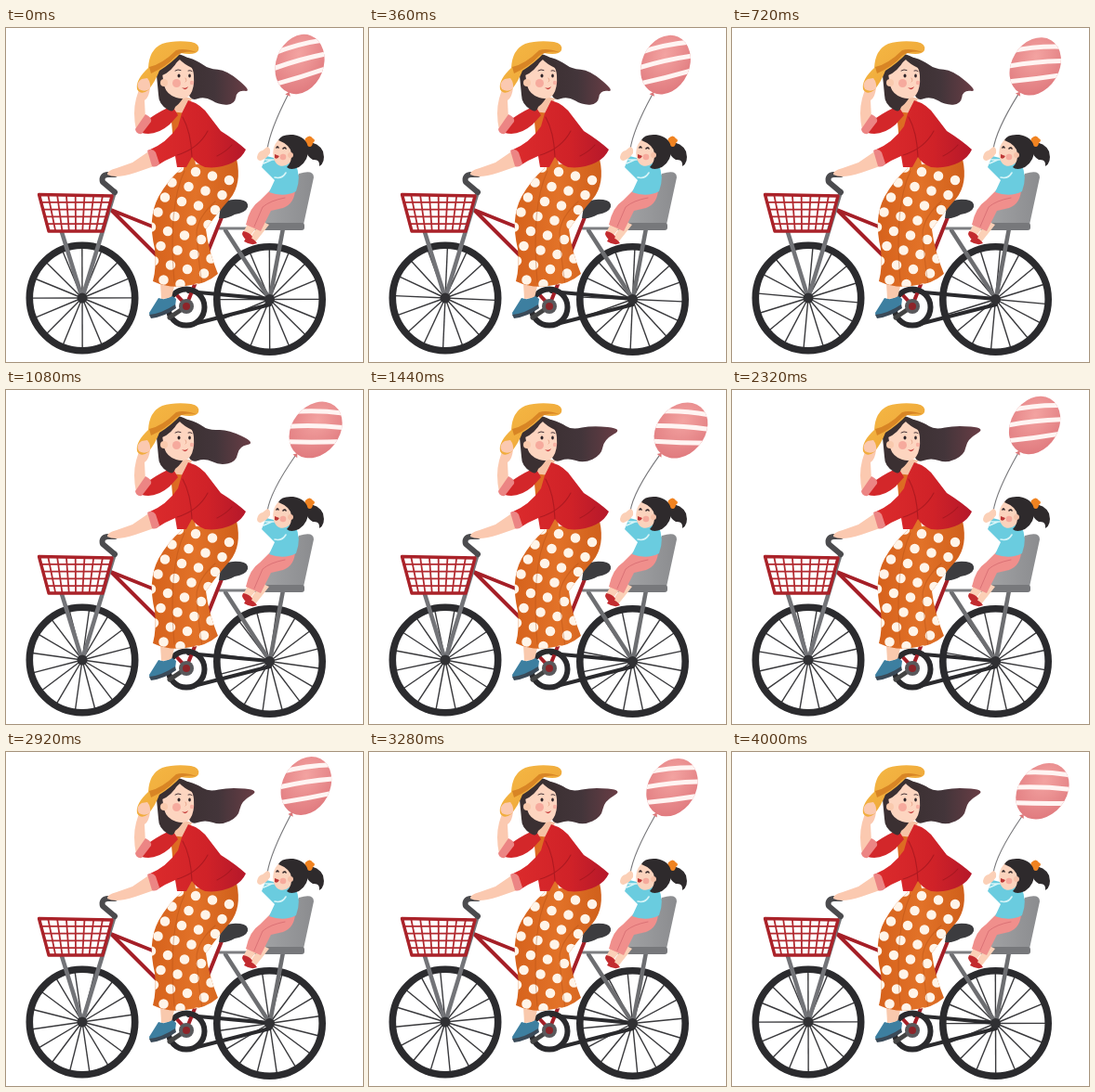
Animation of 384 by 360 pixels, one loop 4040 ms. Source, as an HTML page:

```html
<!DOCTYPE html>
<html lang="en">
<head>
<meta charset="utf-8">
<title>Bike ride</title>
<style>
html, body { margin: 0; width: 100%; height: 100%; overflow: hidden; background: #fff }
svg { display: block; width: 384px; height: 360px }
.line { fill: none; stroke-linecap: round; stroke-linejoin: round }
</style>
</head>
<body>
<svg viewBox="0 0 384 360">
  <defs>
    <linearGradient id="red"><stop stop-color="#dc2b2c"/><stop offset=".6" stop-color="#d02228"/><stop offset="1" stop-color="#b5182a"/></linearGradient>
    <linearGradient id="orange"><stop stop-color="#d6621c"/><stop offset=".5" stop-color="#e27228"/><stop offset="1" stop-color="#d0601b"/></linearGradient>
    <linearGradient id="straw" x2="1" y2="1"><stop stop-color="#f5b945"/><stop offset="1" stop-color="#eda236"/></linearGradient>
    <linearGradient id="grey"><stop stop-color="#a3a4a6"/><stop offset="1" stop-color="#8b8c8f"/></linearGradient>
    <linearGradient id="brown"><stop stop-color="#3b3032"/><stop offset=".5" stop-color="#43353a"/><stop offset="1" stop-color="#693d45"/></linearGradient>
    <radialGradient id="pink" cx=".4" cy=".35" r=".7"><stop stop-color="#f3a3a1"/><stop offset="1" stop-color="#e07a7e"/></radialGradient>
    <clipPath id="skin"><ellipse rx="25.5" ry="33"/></clipPath>
    <clipPath id="skirt"><use href="#dress"/></clipPath>
  </defs>

  <!-- rear wheel, drive and child seat -->
  <g class="wheel" transform="translate(283.5 292.500)"></g>
  <g class="line">
    <path d="M196 284L283 292M198 320L284 298" stroke="#2a2a2d" stroke-width="4"/>
    <path d="M236 218L283 291M298 216L284 291" stroke="#6d6e71" stroke-width="4.5"/>
    <path d="M230 216H300" stroke="#7d7e81" stroke-width="3"/>
  </g>
  <circle cx="283.5" cy="292.5" r="5.5" fill="#303033"/>
  <path d="M315 157Q331 152 331 161L320 212H271Q275 194 294 192Q305 188 308 171Z" fill="url(#grey)"/>
  <rect x="262" y="210" width="59" height="8" rx="3" fill="#77787b"/>

  <!-- balloon -->
  <path id="string" class="line" stroke="#77777a" stroke-width="1.1"/>
  <g id="balloon">
    <path d="M0 32L-3 36H3Z" fill="#dc7779"/>
    <ellipse rx="25.5" ry="33" fill="url(#pink)"/>
    <g clip-path="url(#skin)"><path class="line" transform="rotate(-36)" d="M-36 -17Q0 -23 36 -18M-36 -2Q0 -6 36 -3M-36 14Q0 14 36 11" stroke="#fff4f2" stroke-width="5"/></g>
  </g>

  <!-- child -->
  <path d="M263 206L254 222L261 226L273 211M275 208L261 228L268 231L283 212" fill="#fbd0b7"/>
  <path d="M255 219Q262 220 265 225L262 230Q255 227 254 222ZM260 225Q267 227 270 232Q264 235 256 230Q257 227 260 225Z" fill="#c32b2f"/>
  <path d="M285 174L311 173Q311 189 298 194L285 197L274 219L258 212Q262 193 273 186Z" fill="#f08f8c"/>
  <path d="M300 183Q284 186 276 193L267 214" class="line" stroke="#db7276" stroke-width="1"/>
  <path d="M324 123Q336 123 341 133Q344 145 337 149Q338 141 330 142Q324 139 322 130Z" fill="#2e2a2c"/>
  <path d="M322 119Q327 114 330 119Q334 121 330 124Q329 130 324 127Q320 123 322 119Z" fill="#f08321"/>
  <path d="M297 144L311 146Q318 160 312 176Q299 183 283 177L289 164L275 150L280 138L288 140Z" fill="#6accdf"/>
  <path d="M277 146L286 142M279 142L288 142M289 161Q297 163 301 156" class="line" stroke="#d8f5f8" stroke-width="1.6"/>
  <ellipse cx="299" cy="133" rx="11.5" ry="16" transform="rotate(12 299 133)" fill="#fbd3bd"/>
  <path d="M293 121Q296 114 309 115Q323 117 325 129Q326 143 315 150Q306 154 302 150Q308 144 307 135Q306 126 293 121Z" fill="#2e2a2c"/>
  <circle cx="306" cy="137" r="3" fill="#f6c1a8"/>
  <circle cx="298" cy="139" r="3.3" fill="#f3948a" opacity=".65"/>
  <path d="M291 129q1 -2 2 0M298 130q2 -2 3 0" class="line" stroke="#302527" stroke-width="1.6"/>
  <path d="M289 136l5 2q-2 4 -5 2z" fill="#bd3736"/>
  <path d="M270 139Q271 133 276 132L281 128Q285 129 284 135L280 140L274 143Q270 143 270 139Z" fill="#fbd0b7"/>

  <!-- bicycle -->
  <g class="line">
    <path d="M113 196L178 261M113 196L170 219M232 204L194 299M194 299L182 286" stroke="#a51f27" stroke-width="4"/>
    <circle cx="194" cy="301" r="19.5" stroke="#2a2a2d" stroke-width="6"/>
    <path d="M194 300L176 312" stroke="#444" stroke-width="5"/>
  </g>
  <circle cx="194" cy="300" r="8" fill="#59595c"/><circle cx="194" cy="300" r="4" fill="#8d2429"/>
  <path d="M231 192Q237 183 252 185Q261 186 260 193Q258 199 246 201Q238 206 229 205Z" fill="#3c3c3f"/>
  <g class="wheel" transform="translate(82 291)"></g>
  <g class="line">
    <path d="M60 220L81 288M117 176L82 291" stroke="#737478" stroke-width="4.5"/>
    <path d="M117 177L104 166Q102 159 109 158H117" stroke="#4b4b4e" stroke-width="6"/>
  </g>
  <circle cx="82" cy="291" r="5.5" fill="#303033"/>
  <path id="basket" class="line" stroke="#b22a30" stroke-width="1.8"/>
  <path d="M35.5 179.5L114 181L104 219H46Z" class="line" stroke="#aa2229" stroke-width="3.4"/>

  <!-- rider -->
  <path id="hair" fill="url(#brown)"/>
  <path d="M166 274L167 292L178 291L182 274Z" fill="#f9c9ad"/>
  <path d="M164 291Q171 294 179 289L183 292L182 300L164 309Q154 313 154 307Z" fill="#3d7fa0"/>
  <path d="M154 309Q167 308 182 298L183 302Q171 311 156 313Z" fill="#3b4a58"/>
  <path d="M180 71L176 94L191 103L200 76Z" fill="#f6c2a5"/>
  <path id="dress" d="M177 90L194 92L204 147L248 141Q254 168 241 184Q226 201 215 217Q218 241 228 265Q215 276 199 277Q177 282 158 273Q162 258 160 238Q152 205 164 182Q174 164 189 151L180 123Z" fill="url(#orange)"/>
  <g clip-path="url(#skirt)">
    <path id="dots" class="line" stroke="#fff4e8" stroke-width="10.500"/>
    <path d="M192 154Q174 192 181 274M225 187Q206 204 205 221Q207 252 211 276" class="line" stroke="#ad4810" stroke-width="1.2" opacity=".35"/>
  </g>
  <path d="M155 132L136 145L119 151Q108 154 109 158Q118 163 139 156L162 148Z" fill="#fbc9b0"/>
  <path d="M144 63L155 64Q154 75 149 78L150 98L140 110Q136 91 140 76Z" fill="#fbc9b0"/>
  <path d="M196 78Q210 82 218 94L231 111Q247 121 258 131Q254 140 244 145Q230 152 214 150Q204 146 200 139L194 150L184 150L182 138Q172 142 163 148L153 132Q173 124 185 106L189 92Z" fill="url(#red)"/>
  <path d="M179 84Q168 88 155 97L146 113Q161 117 176 104L185 94Z" fill="#d3272a"/>
  <path d="M139 109L150 93Q157 96 156 101L146 114Q140 115 139 109Z" fill="#ec8584"/>
  <path d="M152 132Q158 129 161 134L165 146Q162 151 157 149Z" fill="#ec8584"/>
  <path d="M184 137Q207 130 217 111M227 138Q237 133 243 126M190 96Q199 112 200 139" class="line" stroke="#96131c" stroke-width="1.1" opacity=".6"/>
  <path d="M162 51Q166 34 185 30L199 42L194 68Q190 79 182 85Q180 92 174 88Q164 82 164 72Z" fill="#3b3032"/>
  <path d="M168 49Q179 42 187 34Q201 37 202 51Q203 65 198 72Q193 78 183 75Q173 72 170 62Z" fill="#fdd5c0"/>
  <path d="M166 52Q178 48 186 33Q191 39 202 44Q200 31 185 28Q169 31 164 47Z" fill="#3b3032"/>
  <circle cx="170" cy="59" r="4" fill="#f9c9ad"/>
  <circle cx="183.5" cy="59.5" r="4.5" fill="#f3948a" opacity=".65"/>
  <circle cx="200" cy="59" r="2.2" fill="#f3948a" opacity=".55"/>
  <ellipse cx="186" cy="51.5" rx="1.5" ry="2" fill="#30262a"/>
  <ellipse cx="197.5" cy="51.5" rx="1.3" ry="1.9" fill="#30262a"/>
  <path d="M182 46q3 -2 6 -.5M196 46q2 -1 4 .5" class="line" stroke="#49363a" stroke-width="1"/>
  <path d="M193 54q2 3 0 4" class="line" stroke="#e5a186" stroke-width=".9"/>
  <path d="M189 64Q193 66 196 63Q194 69 189 64Z" fill="#c53e3c"/>
  <path d="M153 43Q154 23 168 17Q181 13 199 15Q209 17 207 24Q204 30 188 27Q178 38 165 46Q161 57 153 67Q145 73 141 66Q139 56 153 43Z" fill="url(#straw)"/>
  <path d="M154 42Q168 39 183 24Q191 21 205 26Q191 24 183 30Q172 42 156 49Z" fill="#d88525"/>
  <path d="M143 66Q139 59 146 55L152 54Q156 59 155 65Q150 70 143 66Z" fill="#fbc9b0"/>
</svg>
<script>
const $ = id => document.getElementById(id);
const LOOP = 4040, TURN = 2000;
const mix = (a, b, k) => a + (b - a) * k;
const ease = k => (1 - Math.cos(Math.PI * Math.min(1, Math.max(0, k)))) / 2;

// Wheels: fixed tyre, turning spokes
let rays = '';
for (let a = 0; a < 360; a += 22.5) rays += `<path d="M0 0V54" transform="rotate(${a})"/>`;
for (const wheel of document.querySelectorAll('.wheel'))
  wheel.innerHTML = `<g class="spokes" stroke="#39393c" stroke-width="1.4">${rays}</g>
    <circle r="56.7" fill="none" stroke="#2b2b2e" stroke-width="7.6"/>`;
const spokes = document.querySelectorAll('.spokes');

let grid = '';
for (let i = 1; i < 8; i++) grid += `M${35.5 + i * 9.8} 180L${46 + i * 7.25} 219`;
for (let j = 1; j < 5; j++) grid += `M${35.5 + j * 2} ${180 + j * 7.8}H${114 - j * 2}`;
$('basket').setAttribute('d', grid);

// Polka dots on a slanted lattice, cut by the dress
let dots = '';
for (let row = 0; row < 9; row++)
  for (let col = -4; col < 8; col++)
    dots += `M${204 + col * 18 - row * 7.5} ${155 + col * 4.5 + row * 16}h.01`;
$('dots').setAttribute('d', dots);

// Hair outline blown level; droop grows with distance from the head
const lock = [[186, 29], [206, 35], [218, 43], [240, 38], [274, 41], [253, 53],
  [250, 70], [231, 79], [214, 73], [198, 79], [194, 60]];

// Closed curve through the midpoints of neighbouring points
function blob(points) {
  const mid = (a, b) => `${(a[0] + b[0]) / 2} ${(a[1] + b[1]) / 2}`;
  return 'M' + mid(points.at(-1), points[0]) +
    points.map((p, i) => `Q${p} ${mid(p, points[(i + 1) % points.length])}`).join('') + 'Z';
}

// Balloon turning points: time, x, y
const sway = [[0, 316, 39], [1400, 335.5, 43.5], [2760, 322.5, 36.3], [4200, 334.5, 42.5]];

function draw(t) {
  for (const s of spokes) s.setAttribute('transform', `rotate(${-360 * t / TURN})`);

  const i = sway.findIndex(s => s[0] > t), a = sway[i - 1], b = sway[i];
  const k = ease((t - a[0]) / (b[0] - a[0]));
  const x = mix(a[1], b[1], k), y = mix(a[2], b[2], k);
  const tilt = x - 295, r = tilt * Math.PI / 180;
  $('balloon').setAttribute('transform', `translate(${x} ${y}) rotate(${tilt})`);
  $('string').setAttribute('d', `M${x - 36 * Math.sin(r)} ${y + 36 * Math.cos(r)}Q284 110 281 131`);

  const droop = 1 - ease((t - 720) / 800);
  $('hair').setAttribute('d', blob(lock.map(([px, py]) => {
    const bend = droop * (Math.max(0, px - 204) / 70) ** 2;
    return [px - 9 * bend, py + 28 * bend];
  })));
}

const start = performance.now();
(function tick() {
  draw((performance.now() - start) % LOOP);
  requestAnimationFrame(tick);
})();
</script>
</body>
</html>
```
